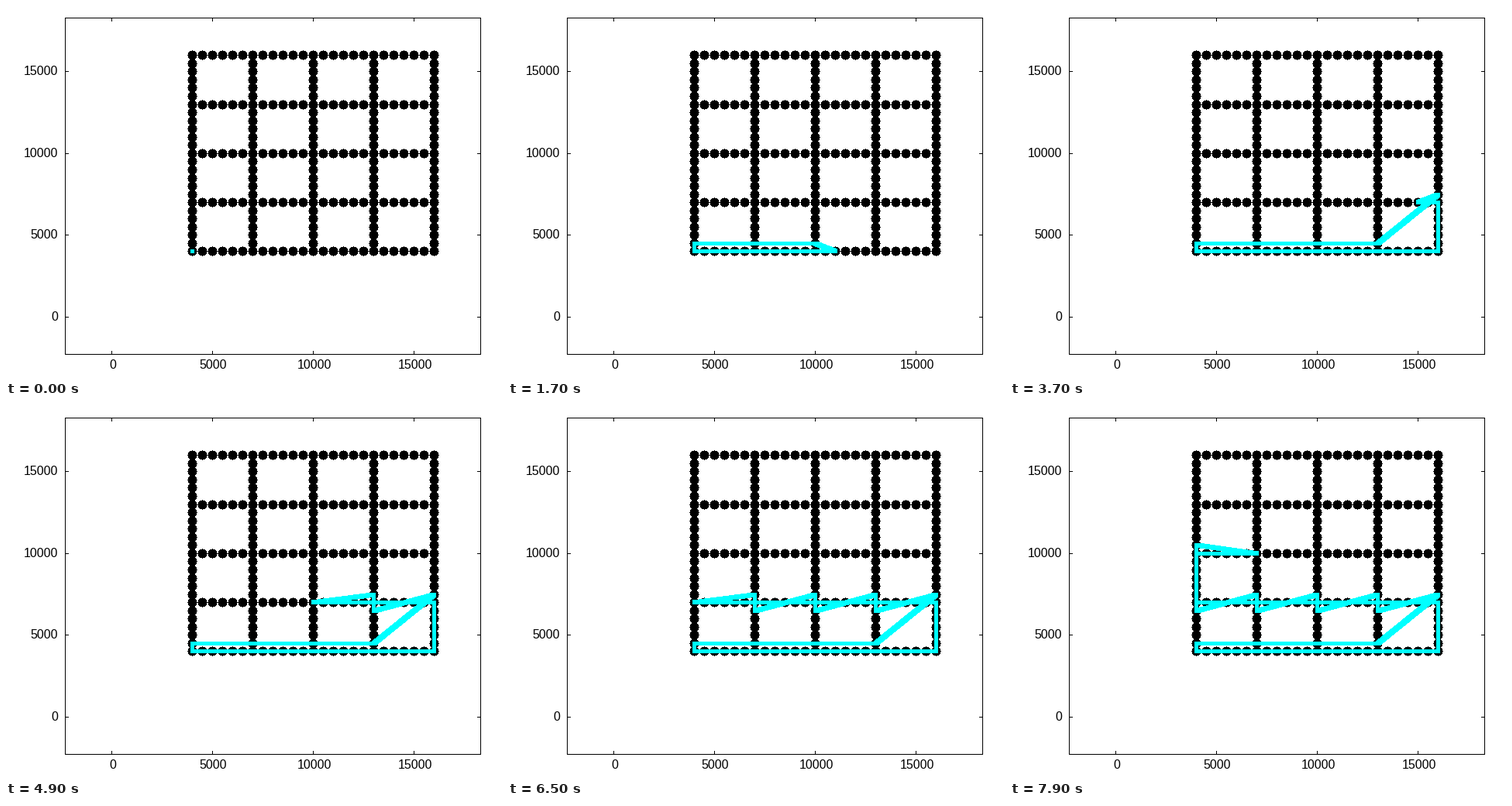
Write a matplotlib script that moves like this. It is 640 px wide and 480 px high and loops after 8 s.

```python
import math
import matplotlib.pyplot as plt
from matplotlib.animation import FuncAnimation
from matplotlib.collections import PolyCollection

W, H, DPI = 640, 480, 100
FRAMES, INTERVAL = 80, 100
LEFT, RIGHT, TOP, BOTTOM = 76, 612, 15, 449
N, CELL = 24, 6          # grid steps per side, steps per cell
RADIUS, PEN = 6, 2.5     # dot radius, half width of the square pen


def to_px(x, y):
    """Pixel that holds the data point (x, y)."""
    return math.floor(136.5 + 0.026 * x), math.floor(401.35 - 0.0211 * y)


def node_px(node):
    return to_px(4000 + 500 * node[0], 4000 + 500 * node[1])


def box(x0, y0, x1, y1):
    """Rectangle covering the pixels x0..x1, y0..y1 inclusive."""
    return [(x0, y0), (x1 + 1, y0), (x1 + 1, y1 + 1), (x0, y1 + 1)]


def dot(cx, cy):
    """Hard-edged disc built from pixel rows."""
    right, left = [], []
    for dy in range(-RADIUS, RADIUS + 1):
        half = math.isqrt(RADIUS * RADIUS - dy * dy)
        for y in (cy + dy, cy + dy + 1):
            right.append((cx + half + 1, y))
            left.append((cx - half, y))
    return right + left[::-1]


def stroke(a, b):
    """Area swept by a square pen moving from pixel a to pixel b."""
    (ax, ay), (bx, by) = [(x + 0.5, y + 0.5) for x, y in (a, b)]
    sx = PEN if bx >= ax else -PEN
    sy = PEN if by >= ay else -PEN
    return [(ax - sx, ay - sy), (ax + sx, ay - sy), (bx + sx, by - sy),
            (bx + sx, by + sy), (bx - sx, by + sy), (ax - sx, ay + sy)]


def on_grid(i, j):
    return 0 <= i <= N and 0 <= j <= N and (i % CELL == 0 or j % CELL == 0)


def search(count):
    """Depth-first walk; one closed outline (trail + open nodes) per push."""
    start = (0, 0)
    node, trail, stack, seen = start, [start], [], {start}
    outlines = [[start, start]]
    while len(outlines) < count:
        i, j = node
        for di, dj in ((0, -1), (0, 1), (-1, 0), (1, 0)):
            nxt = (i + di, j + dj)
            if on_grid(*nxt) and nxt not in seen:
                seen.add(nxt)
                stack.append(nxt)
                outlines.append(trail + stack[::-1] + [start])
        node = stack.pop()
        trail.append(node)
    return outlines[:count]


fig = plt.figure(figsize=(W / DPI, H / DPI), dpi=DPI, facecolor="white")
ax = fig.add_axes([0, 0, 1, 1])
ax.set_xlim(0, W)
ax.set_ylim(H, 0)
ax.axis("off")


def add_shapes(shapes, color, z):
    coll = PolyCollection(shapes, facecolors=color, edgecolors="none",
                          linewidths=0, antialiaseds=False, zorder=z)
    coll.set_snap(False)
    ax.add_collection(coll, autolim=False)
    return coll


# Border, mirrored ticks and labels
lines = [box(LEFT, TOP, RIGHT, TOP), box(LEFT, BOTTOM, RIGHT, BOTTOM),
         box(LEFT, TOP, LEFT, BOTTOM), box(RIGHT, TOP, RIGHT, BOTTOM)]
font = dict(family="Liberation Sans", size=16 * 72 / DPI, color="black",
            va="baseline")
for value in range(0, 15001, 5000):
    x, y = to_px(value, value)
    lines += [box(x, TOP, x, TOP + 4), box(x, BOTTOM - 4, x, BOTTOM),
              box(LEFT, y, LEFT + 4, y), box(RIGHT - 4, y, RIGHT, y)]
    ax.text(x + 1.5, 468, str(value), ha="center", **font)
    ax.text(67, y + 5, str(value), ha="right", **font)
add_shapes(lines, "black", 1)

nodes = [(i, j) for i in range(N + 1) for j in range(N + 1) if on_grid(i, j)]
add_shapes([dot(*node_px(n)) for n in nodes], "black", 2)

path = add_shapes([], "#00ffff", 3)
outlines = search(FRAMES)


def update(k):
    pts = [node_px(n) for n in outlines[k]]
    path.set_verts([stroke(a, b) for a, b in zip(pts, pts[1:])])
    return path,


anim = FuncAnimation(fig, update, frames=FRAMES, interval=INTERVAL,
                     repeat=True, repeat_delay=0, blit=False)
plt.show()
```
